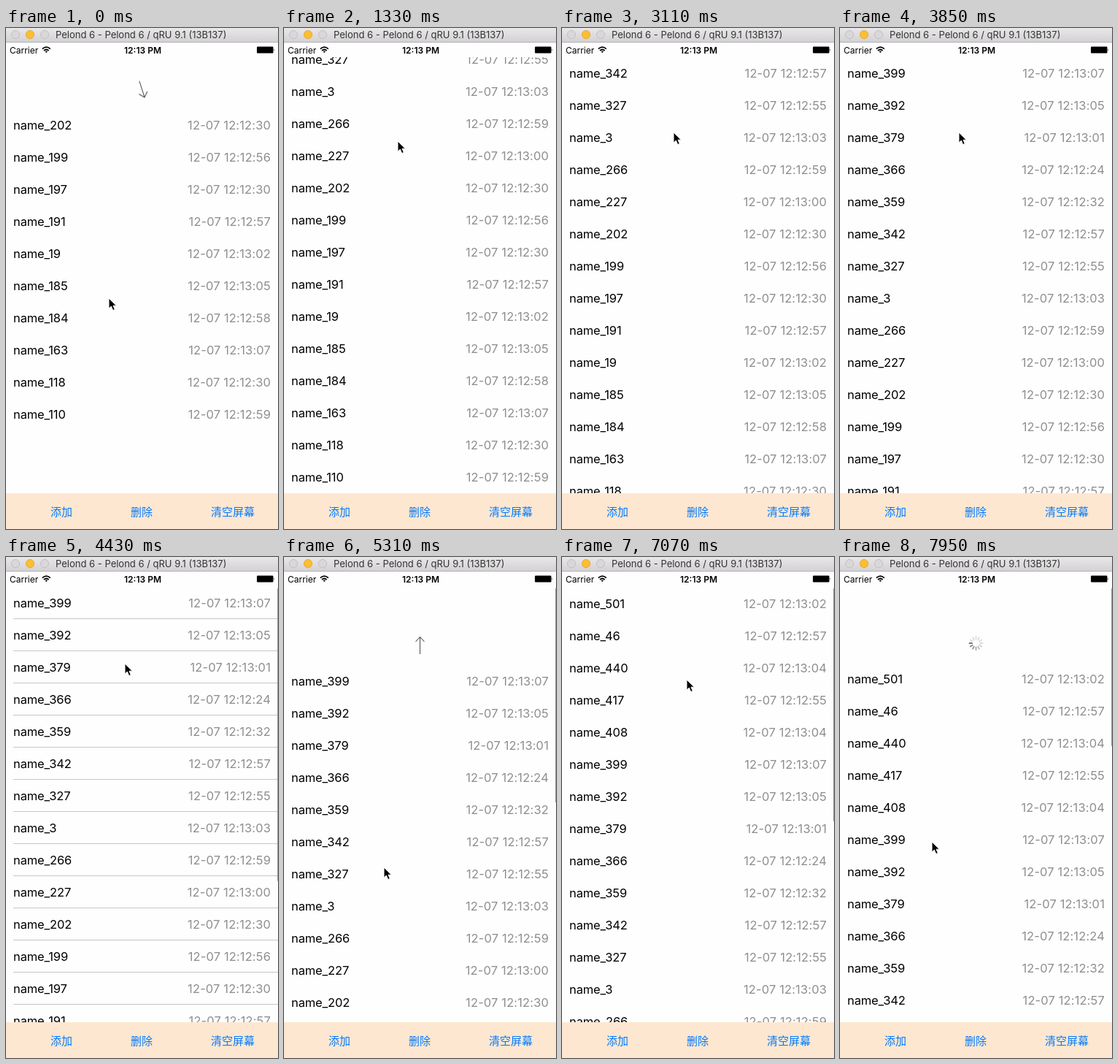
Write an HTML page that moves like this. It is 373 px wide and 686 px high and loops after 8 s.

```html
<!DOCTYPE html>
<html lang="zh-CN">
<head>
<meta charset="utf-8">
<title>Pull to refresh</title>
<style>
html, body { margin: 0; width: 100%; height: 100%; overflow: hidden; background: #fefefe; }
svg { display: block; width: 373px; height: 686px; font-family: Inter, Roboto, sans-serif; }
.row { font-size: 16.5px; letter-spacing: -.12px; }
.date { fill: #8f8f8f; text-anchor: end; letter-spacing: .13px; }
.tools { font: 15px "Noto Sans CJK SC", "Noto Sans CJK", sans-serif; fill: #007aff; }
</style>
</head>
<body>
<svg viewBox="0 0 373 686">
  <defs>
    <linearGradient id="chrome" x2="0" y2="1">
      <stop stop-color="#e9e7e9"/><stop offset="1" stop-color="#d2d0d2"/>
    </linearGradient>
    <clipPath id="view"><rect y="40" width="373" height="597"/></clipPath>
  </defs>
  <rect width="373" height="686" fill="#fefefe"/>
  <g clip-path="url(#view)">
    <path id="arrow" d="M0-12V11.5M-6 5L0 11.5L6 5" fill="none" stroke="#555" stroke-width="1.1"/>
    <g id="spinner" stroke="#555" stroke-width="1.8" stroke-linecap="round"></g>
    <g id="list"></g>
    <rect id="bar" x="372" y="43" width="1" fill="#9a9a9a"/>
  </g>

  <rect width="373" height="20" fill="url(#chrome)"/>
  <rect y="19" width="373" height="1" fill="#b5b3b5"/>
  <g stroke-width=".8">
    <circle cx="13" cy="9" r="5.6" fill="#d9d7d9" stroke="#bcbabc"/>
    <circle cx="33" cy="9" r="5.6" fill="#fdbe2f" stroke="#e0a32a"/>
    <circle cx="53" cy="9" r="5.6" fill="#d9d7d9" stroke="#bcbabc"/>
  </g>
  <text x="68" y="14" font-size="13" fill="#333">Pelond 6 - Pelond 6 / qRU 9.1 (13B137)</text>

  <text x="5" y="34.5" font-size="12">Carrier</text>
  <g fill="none" stroke="#000" stroke-width="1.7">
    <path d="M49.8 28.6Q55.3 23.6 60.8 28.6M52 31Q55.3 28 58.6 31"/>
    <path d="M53.6 32.2Q55.3 30.8 57 32.2L55.3 34Z" fill="#000" stroke="none"/>
  </g>
  <text x="187.5" y="34.5" font-size="12" font-weight="600" text-anchor="middle">12:13 PM</text>
  <rect x="344" y="25.5" width="22.5" height="9" rx="1.2"/>
  <path d="M367.5 28.5Q369 30 367.5 31.5Z"/>

  <rect y="637" width="373" height="49" fill="#fee7d1"/>
  <g class="tools">
    <text x="61" y="668">添加</text>
    <text x="171" y="668">删除</text>
    <text x="281" y="668">清空屏幕</text>
  </g>
  <g id="cursor">
    <path id="tip" d="M0 0V14.2L3.3 11.1L5.7 16.6L8.3 15.5L6 10.2H10.4Z" stroke="#fff"/>
  </g>
</svg>
<script>
const LOOP = 8000, STEP = 147.2, ROW = 44, TOP = 40, VIEW = 594;
const HEAD = 54, PEAK = 108, BATCH = 5, TURN = 250, SLIDE = 300;
const $ = id => document.getElementById(id);

// Rows sorted by name, newest batches at the top.
const records = `
  name_501 12:13:02, name_46 12:12:57, name_440 12:13:04, name_417 12:12:55, name_408 12:13:04,
  name_399 12:13:07, name_392 12:13:05, name_379 12:13:01, name_366 12:12:24, name_359 12:12:32,
  name_342 12:12:57, name_327 12:12:55, name_3 12:13:03, name_266 12:12:59, name_227 12:13:00,
  name_202 12:12:30, name_199 12:12:56, name_197 12:12:30, name_191 12:12:57, name_19 12:13:02,
  name_185 12:13:05, name_184 12:12:58, name_163 12:13:07, name_118 12:12:30, name_110 12:12:59
`.trim().split(/,\s+/);

// One gesture: when the drag starts, its length, release, row insertion, and the pointer's ends.
const pulls = [
  { start: -276, drag: 455, release: 290, insert: 1131, from: [155, 160], to: [139, 406] },
  { start: 1597, drag: 780, release: 2380, insert: 3210, from: [157, 155], to: [135, 442] },
  { start: 4380, drag: 780, release: 5500, insert: 6420, from: [163, 143], to: [137, 425] },
  { start: 7000, drag: 780, release: 7914, insert: 9000, from: [172, 161], to: [126, 390] }
];

const mix = (a, b, k) => a + (b - a) * k;
const ease = (t, from, length) => {
  const p = Math.min(1, Math.max(0, (t - from) / length));
  return p * p * (3 - 2 * p);
};
const show = (node, on) => { node.style.display = on ? '' : 'none'; };
const move = (node, transform) => node.setAttribute('transform', transform);

$('list').innerHTML = records.map(record => {
  const [name, time] = record.split(' ');
  return `<g class="row"><text x="10" y="28">${name}</text>` +
    `<text class="date" x="363" y="28">12-07 ${time}</text>` +
    `<rect class="line" x="10" y="43.5" width="363" height="1" fill="#c6c5c9"/></g>`;
}).join('');
$('spinner').innerHTML = Array.from({ length: 12 }, (_, i) =>
  `<path d="M0-5.4V-9" transform="rotate(${i * 30})"/>`).join('');
const rows = [...$('list').children], lines = [...document.querySelectorAll('.line')];
const petals = [...$('spinner').children];

// The pointer leads the list down, then wanders back to where the next drag begins.
function pointer(t) {
  const i = pulls.filter(p => t >= p.start).length - 1;
  const pull = pulls[i], next = pulls[i + 1];
  const down = ease(t, pull.start, pull.drag * .8);
  return [1200, 600].map((back, axis) => {
    const at = mix(pull.from[axis], pull.to[axis], down);
    return Math.round(next ? mix(at, next.from[axis], ease(t, pull.release, back)) : at);
  });
}

function drawList(first, off) {
  // Hairlines only survive the half-size picture on half-pixel offsets.
  const hairline = off % 1 !== 0;
  rows.forEach((row, i) => {
    show(row, i >= first);
    show(lines[i], hairline);
    move(row, `translate(0 ${TOP + (i - first) * ROW + off})`);
  });
}

function drawHeader(t, pull, end, off) {
  const place = `translate(186.5 ${TOP + off - HEAD / 2})`;
  const loading = t >= pull.release && t < end;
  show($('arrow'), off > 0 && !loading);
  move($('arrow'), `${place} rotate(${-180 * ease(t, pull.start + pull.drag / 2, TURN)})`);
  show($('spinner'), off > 0 && loading);
  move($('spinner'), place);
  const lead = 9 + Math.floor((t - pull.release) / 1000 * 12);
  petals.forEach((petal, i) => {
    const age = ((lead - i) % 12 + 12) % 12;
    petal.setAttribute('opacity', Math.max(.2, .8 - age * .1));
  });
}

function draw(t) {
  const done = pulls.filter(p => t >= p.insert).length;
  const first = BATCH * (pulls.length - 1 - done);
  const pull = pulls[done], end = pull.insert - 200;

  let off = PEAK * ease(t, pull.start, pull.drag)
    - (PEAK - HEAD) * ease(t, pull.release, TURN) - HEAD * ease(t, end - TURN, TURN);
  if (done) off -= BATCH * ROW * (1 - ease(t, pulls[done - 1].insert, SLIDE));
  off = Math.round(off * 2) / 2;

  drawList(first, off);
  drawHeader(t, pull, end, off);

  const content = (records.length - first) * ROW;
  show($('bar'), t >= pull.start && t < end && content > VIEW);
  $('bar').setAttribute('height', Math.max(8, VIEW * VIEW / content - Math.abs(off)));
  move($('cursor'), `translate(${pointer(t)})`);
}

function tick() {
  const t = performance.now() % LOOP;
  draw(Math.max(0, Math.floor((t - 1) / STEP)) * STEP);
  requestAnimationFrame(tick);
}
tick();
</script>
</body>
</html>
```
